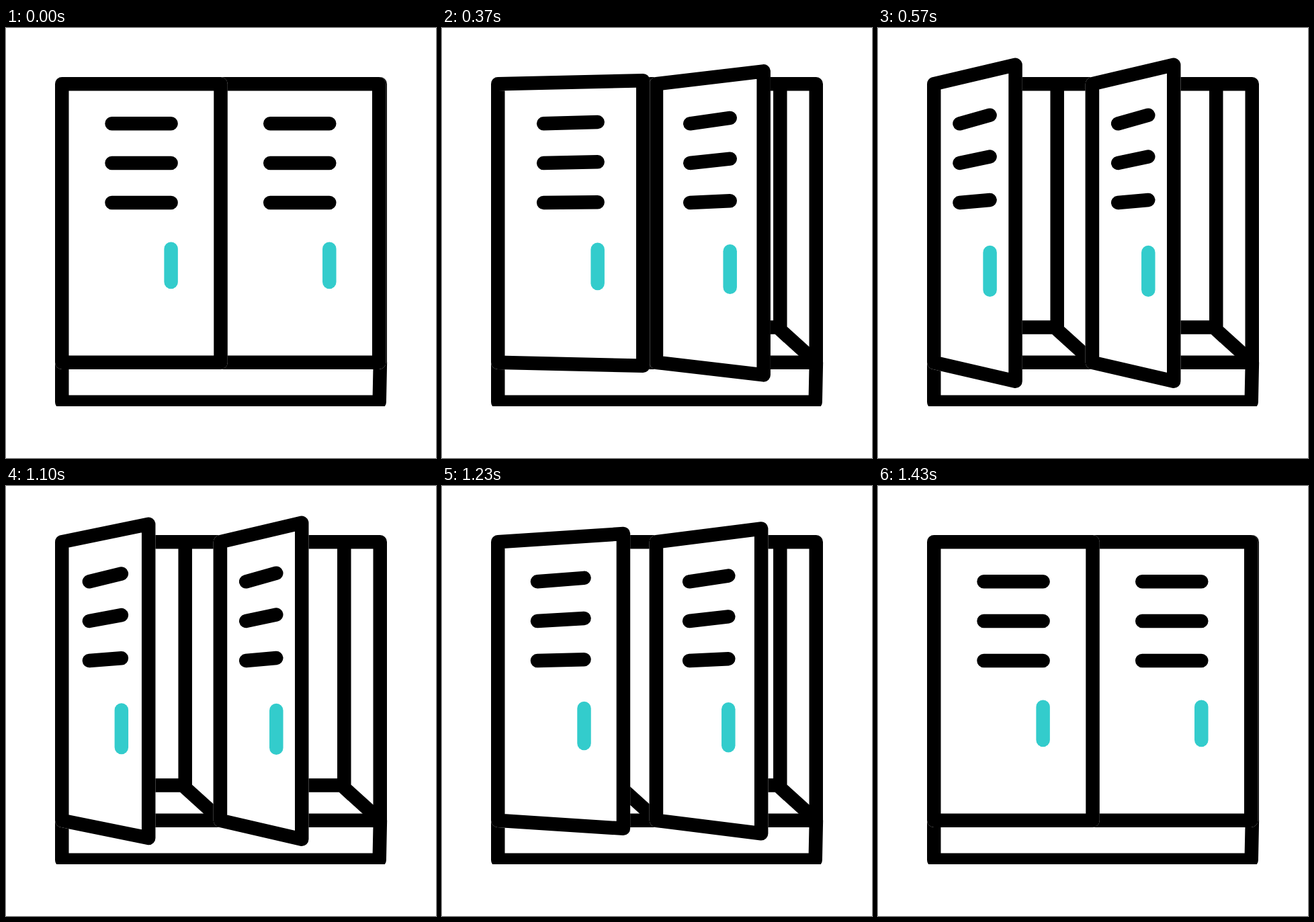
Recreate the animation shown at these times as an HTML page. Size 640x640 px, loop 1.67 s.

```html
<!DOCTYPE html>
<html lang="en">
<head>
<meta charset="utf-8">
<title>Lockers</title>
<style>
  html, body { margin: 0; width: 100%; height: 100%; overflow: hidden; background: #fff; }
  svg { display: block; width: 100%; height: 100%; }
  path { fill: none; stroke: #000; stroke-width: 20.5; stroke-linecap: round; stroke-linejoin: round; }
  .backing { fill: #fff; stroke: #fff; }
  .handle { stroke: #3cc; }
</style>
</head>
<body>
<svg viewBox="0 0 640 640">
  <defs>
    <clipPath id="floor"><path d="M0 0H640V563H0Z"/></clipPath>
    <g id="interior">
      <path d="M266.7 83.25V445.4H83.25M266.7 449L319.7 497"/>
    </g>
    <g id="door">
      <path class="backing"/>
      <path class="outline"/>
      <path class="slats"/>
      <path class="handle"/>
    </g>
  </defs>
  <path clip-path="url(#floor)" d="M83.25 497.75V556.75H555.7L556.9 497.75"/>
  <use href="#interior"/>
  <use href="#interior" x="236.6"/>
  <path d="M83.25 83.25H556.75V497.75H83.25ZM319 83.25V497.75"/>
  <g id="right" transform="translate(235.7 0)"></g>
  <g id="left"></g>
</svg>
<script>
  const LOOP = 1670;
  const OPEN_STEPS = 6.57, CLOSE_STEPS = 7.97;
  // Row height of each slat and how far its free end rises when open.
  const SLATS = [[142.3, 12.6], [201, 9.5], [260, 4]];

  const clamp = v => Math.min(1, Math.max(0, v));

  function makeDoor(id, openAt, closeAt) {
    const host = document.getElementById(id);
    host.append(...document.getElementById('door').cloneNode(true).children);
    const part = name => host.querySelector('.' + name);
    return {
      openAt, closeAt,
      backing: part('backing'), outline: part('outline'),
      slats: part('slats'), handle: part('handle')
    };
  }

  function drawDoor(door, p) {
    const edge = 319.55 - 115 * p;
    const outline = `M83.25 83.25L${edge} ${83.25 - 28.4 * p}V${497.75 + 28 * p}L83.25 497.75Z`;
    const near = 157.5 - 36 * p, far = 245.6 - 79 * p;
    door.backing.setAttribute('d', outline);
    door.outline.setAttribute('d', outline);
    door.slats.setAttribute('d',
      SLATS.map(([y, rise]) => `M${near} ${y}L${far} ${y - rise * p}`).join(''));
    door.handle.setAttribute('d', `M${far} ${328.8 + 5.1 * p}V${377.9 + 11.9 * p}`);
  }

  const doors = [makeDoor('right', 6.625, 34.58), makeDoor('left', 9.84, 32.47)];

  function render(now) {
    // Motion advances 30 steps a second, aligned to 10 ms ticks.
    const tick = Math.floor((now % LOOP) / 10) * 10;
    const step = Math.floor((tick + 3.5) * 0.03);
    for (const door of doors) {
      const opened = clamp((step - door.openAt) / OPEN_STEPS);
      const closed = clamp((step - door.closeAt) / CLOSE_STEPS);
      drawDoor(door, opened - closed);
    }
  }

  function loop() {
    render(performance.now());
    requestAnimationFrame(loop);
  }
  loop();
</script>
</body>
</html>
```
